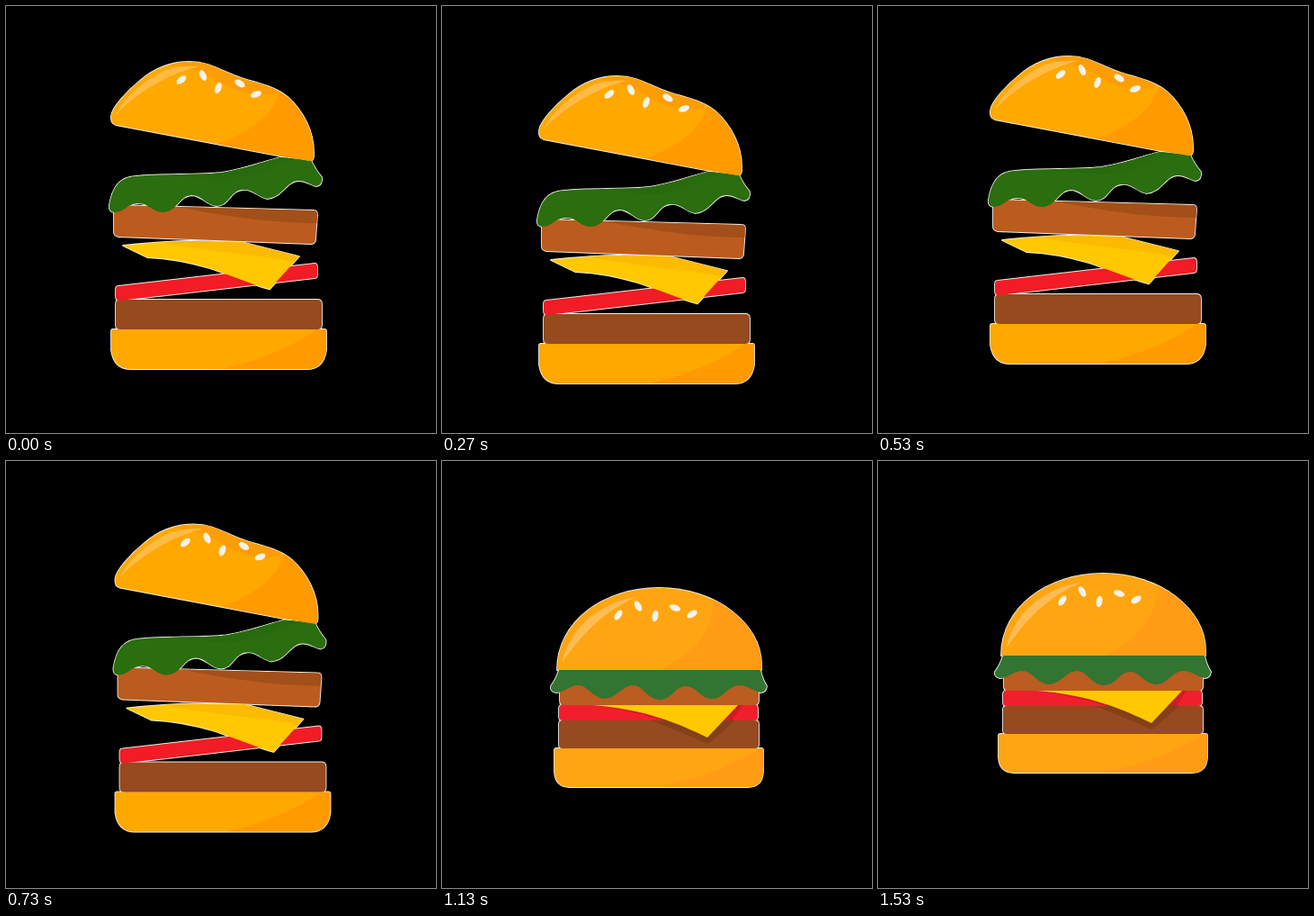
These frames come from a looping animation (478x474 px, 1.59 s). An HTML page:

```html
<!DOCTYPE html>
<html lang="en">
<head>
<meta charset="utf-8">
<title>Burger</title>
<style>
  html, body { margin: 0; width: 100%; height: 100%; overflow: hidden; background: #000; }
  svg { display: block; width: 100%; height: 100%; }
  .rim { fill: none; stroke: #f2eee6; stroke-width: 1.8; stroke-linejoin: round; }
</style>
</head>
<body>
<svg viewBox="0 0 478 474">
  <g id="open"></g>
  <g id="closed"></g>
</svg>
<script>
const LOOP = 1590, FRAMES = 24;
const starts = Array.from({ length: FRAMES }, (_, i) => Math.round(i * 20 / 3) * 10);

// Each layer: outline, colour, then shades clipped to the outline.
const openLayers = [
  ['M117 361Q117 359 119 359H354Q356 359 356 361V382Q353 403 334 403H139Q120 403 117 382Z', '#ffa800',
    ['M346 359Q304 389 232 405H358V359Z', '#ff9a00']],
  ['M127 326H346Q351 326 351 331V354Q351 359 346 359H127Q122 359 122 354V331Q122 326 127 326Z', '#964a1e'],
  ['M125 311L343 286Q346 286 346 290V298Q346 302 343 302L126 327Q122 327 122 322V315Q122 311 125 311Z', '#f11c25'],
  ['M130 266C150 264 180 261 205 261L262 262L326 278L293 314.5C270 308 250 299 226 291C200 283 180 280 157 279Z', '#ffc800',
    ['M170 258H262L330 278L321 285C290 276 250 277 170 262Z', '#fcba00']],
  ['M120 221L342 227Q346 227 346 232L344 260Q343 264 339 264L125 256Q120 255 120 251Z', '#bb5c1e',
    ['M185 222L347 227V241C300 241 250 235 185 222Z', '#a34f19']],
  ['M115 221C118 203 125 190 144 189C175 186 210 188 240 185C265 181 285 173 305 168L339 171Q344 182 351 190' +
   'Q352 199 345 200C339 199 334 194 325 194C312 194 307 213 290 214C278 211 275 203 263 204C249 205 248 222 234 222' +
   'C222 221 218 210 206 210C192 211 190 229 174 229C163 229 158 218 146 219C134 220 131 229 121 229Q114 229 115 221Z', '#2a6e0f',
    ['M180 186L240 182L305 166L320 170C290 182 262 193 240 193Q215 191 180 187Z', '#286a0e']],
  ['M117 122C118 113 134 95 149 83C165 69 184 62 204 62C228 62 240 73 262 80C280 86 299 89 313 101' +
   'C331 117 342 140 342 162Q343 172 338 172L302 166L122 132Q116 130 117 122Z', '#ffa800',
    ['M305 84C306 112 280 138 235 153L345 180V90Z', '#ff9a00'],
    ['M180 66C210 68 226 77 242 87C260 97 278 101 300 97L302 84L208 58Z', '#fc9d05'],
    ['M122 121C130 103 152 83 178 71C190 67 202 66 214 67C182 75 146 95 122 121Z', '#ffbb45']]
];
const openSeeds = [[195, 82, -38], [219, 77, 65], [236, 91, -70], [260, 86, 32], [278, 98, -20]];

const closedLayers = [
  ['M113 321Q113 319 115 319H343Q345 319 345 321V345Q344 362 328 362H130Q114 362 113 345Z', '#ffa512',
    ['M342 319Q296 349 222 363H347V319Z', '#ff9b15']],
  ['M122 288H336Q340 288 340 292V315Q340 319 336 319H122Q118 319 118 315V292Q118 288 122 288Z', '#964a20',
    ['M190 280C232 290 254 302 284 314L316 286Z', '#843f1b']],
  ['M122 270H336Q339 271 339 275V284Q339 288 335 288H122Q118 288 118 284V275Q118 271 122 270Z', '#f11f2b',
    ['M146 270C185 275 212 281 236 289H310L322 271Z', '#cf1c24']],
  ['M155 271H317L283 307C250 291 215 276 155 271Z', '#ffc800'],
  ['M119 243H340V266Q340 271 335 271H124Q119 271 119 266Z', '#bb5c21'],
  ['M118 232H342Q344 242 349 250Q348 257 342 257C333 255 328 249 318 249C305 250 301 264 288 264' +
   'C274 263 271 250 259 250C247 250 244 265 230 265C215 264 212 249 200 249C187 250 182 264 168 264' +
   'C155 262 150 249 139 249C130 249 124 257 115 257Q108 256 109 250Q115 242 118 232Z', '#327432'],
  ['M116 232C116 178 168 141 229 141C293 141 343 181 343 226V232Z', '#ffa512',
    ['M290 150C290 188 270 214 228 233H345V150Z', '#ff9b15'],
    ['M122 223C128 190 160 157 205 151C170 165 145 190 122 223Z', '#ffbc55']]
];
const closedSeeds = [[184, 171, -55], [206, 161, 60], [225, 172, -80], [247, 163, 20], [266, 170, -32]];

function build(id, layers, seeds) {
  const rims = layers.map(([d]) => `<path class="rim" d="${d}"/>`).join('');
  const fills = layers.map(([d, color, ...shades], i) => {
    const clip = `${id}-clip${i}`;
    const inner = shades.map(([s, c]) => `<path d="${s}" fill="${c}"/>`).join('');
    return `<clipPath id="${clip}"><path d="${d}"/></clipPath>` +
      `<path d="${d}" fill="${color}"/><g clip-path="url(#${clip})">${inner}</g>`;
  }).join('');
  const dots = seeds.map(([x, y, a]) =>
    `<ellipse rx="6.3" ry="3.4" fill="#f6f2ea" transform="translate(${x} ${y}) rotate(${a})"/>`).join('');
  const group = document.getElementById(id);
  group.innerHTML = rims + fills + dots;
  return group;
}

const open = build('open', openLayers, openSeeds);
const closed = build('closed', closedLayers, closedSeeds);

// Shake keys: step, x, y.
const openKeys = [[0, 0, 0], [2, 2, -1], [4, -9, 16], [6, 12.5, -9], [7, 13.5, -9], [8, 8, -6], [10, 0, 10], [11, 4.5, 8.5]];
const closedKeys = [[12, -4, 3], [13, 0, 0], [15, 19, -5], [17, 12, 0], [18, -3, 5], [21, 33, -18], [23, 21, -16]];

function shake(keys, step) {
  const i = Math.max(1, keys.findIndex(k => k[0] >= step));
  const [s0, x0, y0] = keys[i - 1], [s1, x1, y1] = keys[i];
  const u = (step - s0) / (s1 - s0), e = u * u * (3 - 2 * u);
  return [x0 + (x1 - x0) * e, y0 + (y1 - y0) * e];
}

function draw(ms) {
  const t = ms % LOOP;
  const step = starts.filter(s => s <= t).length - 1;
  const isOpen = step < FRAMES / 2;
  const [x, y] = shake(isOpen ? openKeys : closedKeys, step);
  open.style.display = isOpen ? '' : 'none';
  closed.style.display = isOpen ? 'none' : '';
  (isOpen ? open : closed).setAttribute('transform', `translate(${x} ${y})`);
}

const begin = performance.now();
function tick() {
  draw(performance.now() - begin);
  requestAnimationFrame(tick);
}
tick();
</script>
</body>
</html>
```
